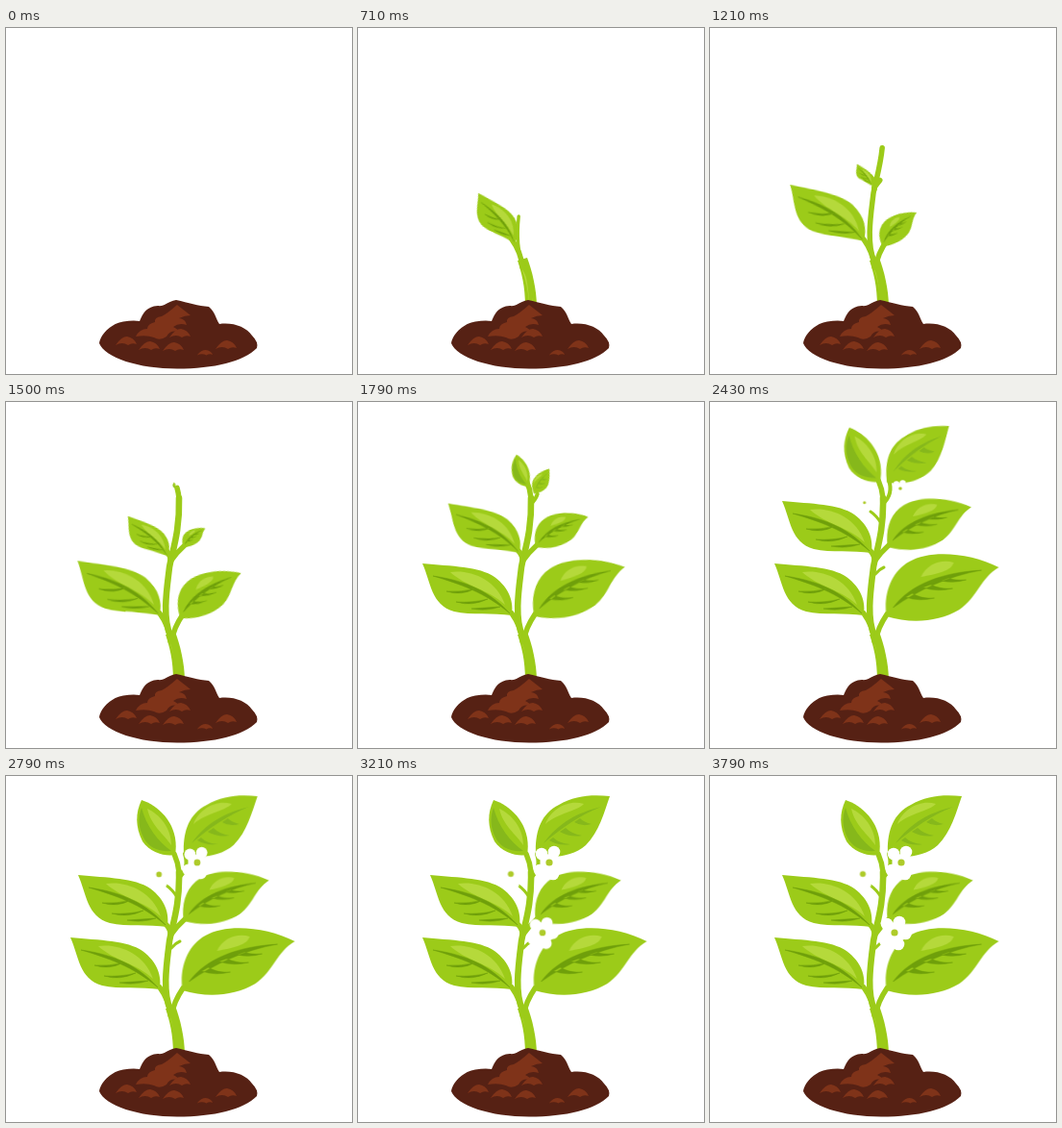
Animation of 360 by 360 pixels, one loop 4 s. Source, as an HTML page:

```html
<!DOCTYPE html>
<html lang="en">
<head>
<meta charset="utf-8">
<title>Growing plant</title>
<style>
html, body { margin: 0; width: 100%; height: 100%; overflow: hidden; background: #fff; }
svg { display: block; width: 100vw; height: 100vh; }
.leaf { fill: #9ccb19; }
.light { fill: #b5d93b; }
.vein { fill: #6f9f0b; stroke: #6f9f0b; stroke-width: .5; stroke-linejoin: round; }
.soft { fill: #86b81b; }
.stalk { fill: none; stroke: #9ccb19; stroke-width: 5.5; stroke-linecap: round; stroke-dasharray: 1 3; }
.clod { fill: #7f3319; }
.a { animation: 4s linear infinite both; }

/* stem and stalks */
.base { transform-origin: 180px 290px; animation-name: base; }
.stem { animation-name: stem; }
.s1 { animation-name: s1; }
.s2 { animation-name: s2; }
.s3 { animation-name: s3; }
.s4 { animation-name: s4; }
.s5 { animation-name: s5; }
.s6 { stroke-width: 4; animation-name: s6; }
.twig { stroke-width: 3; animation-name: twig; }
@keyframes base { 0% { transform: scale(.5, 0); } 11% { transform: none; } }
@keyframes stem {
  0% { stroke-dashoffset: 1.1; stroke-width: 3; }
  1% { stroke-dashoffset: 1; }
  17.75% { stroke-dashoffset: .51; stroke-width: 3.4; }
  30.25% { stroke-dashoffset: .13; stroke-width: 5.5; }
  36.5%, 100% { stroke-dashoffset: 0; stroke-width: 6.6; }
}
@keyframes s1 { 0%, 7% { stroke-dashoffset: 1.1; } 12%, 100% { stroke-dashoffset: 0; } }
@keyframes s2 { 0%, 19% { stroke-dashoffset: 1.1; } 25%, 100% { stroke-dashoffset: 0; } }
@keyframes s3 { 0%, 22% { stroke-dashoffset: 1.1; } 26%, 100% { stroke-dashoffset: 0; } }
@keyframes s4 { 0%, 27% { stroke-dashoffset: 1.1; } 34%, 100% { stroke-dashoffset: 0; } }
@keyframes s5 { 0%, 34% { stroke-dashoffset: 1.1; } 40%, 100% { stroke-dashoffset: 0; } }
@keyframes s6 { 0%, 36% { stroke-dashoffset: 1.1; } 44.75% { stroke-dashoffset: .55; } 59%, 100% { stroke-dashoffset: 0; } }
@keyframes twig { 0%, 51% { stroke-dashoffset: 1.1; } 60%, 100% { stroke-dashoffset: 0; } }

/* leaves unfold around their base */
.l1 { animation-name: l1; }
.r1 { animation-name: r1; }
.l2 { animation-name: l2; }
.r2 { animation-name: r2; }
.l3 { animation-name: l3; }
.r3 { animation-name: r3; }
@keyframes l1 {
  0%, 8% { transform: rotate(36deg) scale(0); }
  17.75% { transform: translate(3px, 2px) rotate(24deg) scale(.6); }
  30.25% { transform: rotate(7.5deg) scale(.9); }
  43.5%, 100% { transform: rotate(0deg) scale(1); }
}
@keyframes r1 {
  0%, 21% { transform: translate(-5px, 6px) rotate(-32deg) scale(0); }
  30.25% { transform: translate(-4px, 4px) rotate(-21deg) scale(.39); }
  44.75% { transform: rotate(-5deg) scale(.84); }
  57%, 100% { transform: rotate(0deg) scale(1); }
}
@keyframes l2 {
  0%, 25% { transform: translate(1px, 8px) rotate(32deg) scale(0); }
  30.25% { transform: translate(0, 7px) rotate(26deg) scale(.25); }
  44.75% { transform: rotate(4.6deg) scale(.84); }
  57%, 100% { transform: rotate(0deg) scale(1); }
}
@keyframes r2 {
  0%, 31% { transform: rotate(-25deg) scale(0); }
  44.75% { transform: rotate(-4.5deg) scale(.64); }
  60.75% { transform: rotate(0deg) scale(.98); }
  66%, 100% { transform: rotate(0deg) scale(1); }
}
@keyframes l3 {
  0%, 36% { transform: translate(2px, 8px) rotate(20deg) scale(0); }
  44.75% { transform: translate(2px, 6px) rotate(11.5deg) scale(.53); }
  60.75% { transform: translate(1px, 1px) rotate(2deg) scale(.97); }
  68%, 100% { transform: rotate(0deg) scale(1); }
}
@keyframes r3 {
  0%, 39% { transform: translate(-2px, 16px) rotate(-28deg) scale(0); }
  44.75% { transform: translate(-2px, 15px) rotate(-20deg) scale(.31); }
  60.75% { transform: translate(-1px, 2px) rotate(-4deg) scale(.89); }
  70%, 100% { transform: rotate(0deg) scale(1); }
}

/* blossoms */
.f1 { animation-name: f1; }
.f2 { animation-name: f2; }
.f3 { animation-name: f3; }
@keyframes f1 {
  0%, 54% { transform: translate(-2px, 4px) scale(0); }
  60.75% { transform: translate(-1px, 0) scale(.5); }
  71%, 100% { transform: scale(1); }
}
@keyframes f2 {
  0%, 54% { transform: translate(3px, 5px) scale(0); }
  60.75% { transform: translate(2px, 3px) scale(.5); }
  71%, 100% { transform: scale(1); }
}
@keyframes f3 {
  0%, 65% { transform: translate(-6px, 6px) scale(0); }
  80.25% { transform: scale(.93); }
  85%, 100% { transform: scale(1); }
}
</style>
</head>
<body>
<svg viewBox="0 0 360 360">
  <defs>
    <g id="left">
      <path class="leaf" d="M-93-54C-62-51-34-51-18-40C-2-28 2-14 0 0C-20-3-42 0-60-4C-84-11-84-34-93-54Z"/>
      <path class="light" d="M-64-45C-44-48-16-38-7-11C-24-27-48-30-64-45Z"/>
      <path class="vein" d="M-82-41C-55-37-26-29-2-2C-28-24-55-33-82-41ZM-68-25Q-52-20-38-28Q-52-24-68-25ZM-58-14Q-41-9-25-17Q-40-13-58-14ZM-42-7Q-26-4-12-9Q-27-8-42-7Z"/>
    </g>
    <g id="right">
      <path class="leaf" d="M0 0C-3-22 4-46 24-57C46-70 88-66 117-51C98-40 95-20 76-7C54 6 26 8 0 0Z"/>
      <path class="light" d="M36-41C42-55 58-60 70-56C68-47 52-44 36-41Z"/>
      <path class="vein" d="M7-9C25-34 60-46 99-48C65-42 34-28 7-9ZM20-20Q34-15 50-19Q36-18 27-24ZM38-30Q53-25 69-29Q56-28 46-33ZM57-37Q70-34 83-38Q70-37 65-40Z"/>
    </g>
    <g id="bloom">
      <g fill="#fff">
        <circle r="9"/>
        <circle cx="5" cy="-11" r="6.3"/>
        <circle cx="11.5" cy="1" r="6.3"/>
        <circle cx="4" cy="12" r="6.3"/>
        <circle cx="-10" cy="8" r="6.3"/>
        <circle cx="-8" cy="-9" r="6.3"/>
      </g>
      <circle fill="#aecb2a" r="3.6"/>
    </g>
    <path id="clod" class="clod" d="M-11 4Q-5-5 1-5Q8-4 11 3Q6 1 2 4Q-4 0-11 4Z"/>
  </defs>

  <g class="a base">
    <path class="leaf" d="M174 290C174 268 170 254 166 242L176 239C181 252 186 272 186 290Z"/>
    <path class="light" d="M170 249Q177 268 178 287L182 287Q180 266 170 249Z"/>
  </g>
  <path class="stalk a stem" pathLength="1" d="M180 288C179 268 176 252 171 243C162 224 168 190 170 172C173 155 181 135 180 100"/>
  <path class="stalk a s1" pathLength="1" d="M171 249Q170 234 160 220"/>
  <path class="stalk a s2" pathLength="1" d="M173 247Q174 236 184 221"/>
  <path class="stalk a s3" pathLength="1" d="M171 168Q172 160 167 155"/>
  <path class="stalk a s4" pathLength="1" d="M171 166Q178 156 186 149"/>
  <path class="stalk a s5" pathLength="1" d="M180 100Q179 90 175 81"/>
  <path class="stalk a s6" pathLength="1" d="M180 106Q191 96 186 81"/>
  <path class="stalk a twig" pathLength="1" d="M178 126Q173 118 167 114"/>
  <path class="stalk a twig" pathLength="1" d="M172 179Q176 174 181 172"/>

  <g transform="translate(160 222)"><use class="a l1" href="#left"/></g>
  <g transform="translate(183.5 223)"><use class="a r1" href="#right"/></g>
  <g transform="translate(168 157)"><use class="a l2" href="#left"/></g>
  <g transform="translate(185 151) rotate(-2) scale(.77)"><use class="a r2" href="#right"/></g>
  <g transform="translate(174 82)"><g class="a l3">
    <path class="leaf" d="M-33-57C-14-51 7-30 2 0C-8 2-24-2-32-14C-39-28-40-42-33-57Z"/>
    <path class="soft" d="M-33-49C-28-30-16-14-2-4C-16-3-26-8-31-18C-36-28-37-38-33-49Z"/>
    <path class="light" d="M-27-48C-14-42-2-28-2-10C-10-22-23-30-27-48Z"/>
  </g></g>
  <g transform="translate(185 80)"><g class="a r3">
    <path class="leaf" d="M0 2C-1-20 4-40 24-50C40-60 60-61 77-59C71-42 66-22 52-8C38 4 18 6 0 2Z"/>
    <path class="light" d="M10-30C16-46 34-56 50-51C42-43 24-42 10-30Z"/>
    <path class="soft" d="M8-10C24-32 44-42 68-48C46-39 28-27 8-10ZM14-13Q24-7 36-9Q24-10 18-16ZM25-22Q36-16 48-18Q37-20 31-26ZM40-32Q48-27 58-30Q50-32 46-36Z"/>
  </g></g>

  <g transform="translate(199 90)"><use class="a f1" href="#bloom"/></g>
  <g transform="translate(159 102) scale(.85)"><use class="a f2" href="#bloom"/></g>
  <g transform="translate(192 163)"><use class="a f3" href="#bloom"/></g>

  <path fill="#562114" d="M97 328C99 317 111 307 122 305.500Q132 304 139 305C143 296 146 290 158 289C165 290 167 285 177 283C190 286 200 289 211 290C218 296 218 302 222 308C236 306 250 311 256 320Q263 327 261 333C247 347 217 354.500 178 354.500C138 354.500 103 343 97 328Z"/>
  <path class="clod" d="M178 288L192 299Q186 299 180 302Q187 303 188 309Q180 306 174 311Q180 314 179 316Q171 314 167 321Q160 326 154 322Q146 319 135 321Q139 313 147 313Q147 308 155 306Q154 301 162 300Q168 297 178 288Z"/>
  <use href="#clod" x="125" y="326"/>
  <use href="#clod" x="149" y="331"/>
  <use href="#clod" x="174" y="332"/>
  <use href="#clod" x="181" y="318"/>
  <use href="#clod" x="229" y="330"/>
  <use href="#clod" transform="translate(207 338) scale(.75 .6)"/>
</svg>
</body>
</html>
```
